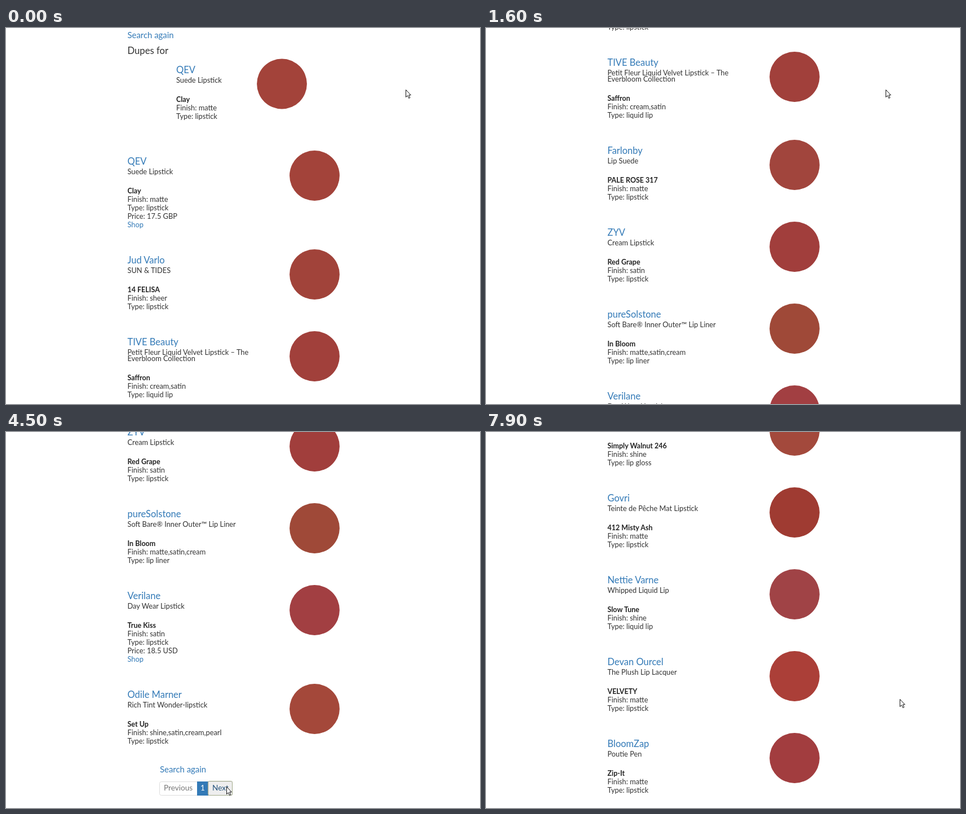
An HTML page that plays this animation: 841 px wide and 666 px high, repeating every 8 s.

```html
<!DOCTYPE html>
<html lang="en">
<head>
<meta charset="utf-8">
<title>Lipstick dupes</title>
<style>
  html, body { margin: 0; width: 100%; height: 100%; overflow: hidden; background: #fff; }
  svg { display: block; width: 841px; height: 666px; font: 12.8px Lato, "Open Sans", sans-serif; }
  text { fill: #333; }
  .brand { font-size: 16.5px; }
  .title { font-size: 16.7px; }
  .again { font-size: 14.9px; }
  .shade { font-size: 12.5px; font-weight: bold; fill: #222; }
  .page { font-size: 13.6px; }
  .link { fill: #337ab7; }
  .muted { fill: #777; }
  .current { fill: #fff; }
  .cursor { fill: #fff; stroke: #111; stroke-linejoin: round; }
</style>
</head>
<body>
<svg id="stage" viewBox="0 0 841 666"></svg>
<script>
const LOOP = 8000;
const TICK = 100;
const LINE = 15;
const stage = document.getElementById("stage");

function add(parent, tag, attrs = {}, content = "") {
  const node = document.createElementNS("http://www.w3.org/2000/svg", tag);
  for (const key in attrs) node.setAttribute(key, attrs[key]);
  node.textContent = content;
  parent.append(node);
  return node;
}

const label = (parent, x, y, content, cls = "") =>
  add(parent, "text", { x, y, class: cls }, content);

// Draws one product and returns the top of the next one.
function product(parent, top, [brand, range, shade, finish, type, color, price], x = 215.5, cx = 547.5) {
  const lines = range.split("|");
  label(parent, x, top + 25, brand, "brand link");
  lines.forEach((line, i) => label(parent, x, top + 42 + i * 11, line));
  let y = top + 65 + lines.length * 11;
  label(parent, x, y, shade, "shade");
  const details = ["Finish: " + finish, "Type: " + type];
  if (price) details.push("Price: " + price);
  for (const detail of details) label(parent, x, y += LINE, detail);
  if (price) label(parent, x, y += LINE, "Shop", "link");
  add(parent, "circle", { cx, cy: top + 44.5, r: 44.4, fill: color });
  return y + 39;
}

const wanted = ["QEV", "Suede Lipstick", "Clay", "matte", "lipstick", "#a3433a"];

function resultPage(products) {
  const page = add(stage, "g");
  label(page, 215.5, 18, "Search again", "again link");
  label(page, 215.5, 46, "Dupes for", "title");
  product(page, 54.5, wanted, 302, 489.5);
  products.reduce((top, item) => product(page, top, item), 217);
  return page;
}

const firstPage = resultPage([
  [...wanted, "17.5 GBP"],
  ["Jud Varlo", "SUN & TIDES", "14 FELISA", "sheer", "lipstick", "#a1433a"],
  ["TIVE Beauty", "Petit Fleur Liquid Velvet Lipstick – The|Everbloom Collection", "Saffron", "cream,satin", "liquid lip", "#a1403b"],
  ["Farlonby", "Lip Suede", "PALE ROSE 317", "matte", "lipstick", "#a1453d"],
  ["ZYV", "Cream Lipstick", "Red Grape", "satin", "lipstick", "#a13e3c"],
  ["pureSolstone", "Soft Bare® Inner Outer™ Lip Liner", "In Bloom", "matte,satin,cream", "lip liner", "#9f4938"],
  ["Verilane", "Day Wear Lipstick", "True Kiss", "satin", "lipstick", "#a23f42", "18.5 USD"],
  ["Odile Marner", "Rich Tint Wonder-lipstick", "Set Up", "shine,satin,cream,pearl", "lipstick", "#a4483a"]
]);

const secondPage = resultPage([
  ["D'Evial Lyon", "Day-Long Liptint", "Simply Walnut 246", "shine", "lip gloss", "#a3493c"],
  ["Govri", "Teinte de Pêche Mat Lipstick", "412 Misty Ash", "matte", "lipstick", "#9f3b32"],
  ["Nettie Varne", "Whipped Liquid Lip", "Slow Tune", "shine", "liquid lip", "#a04346"],
  ["Devan Ourcel", "The Plush Lip Lacquer", "VELVETY", "matte", "lipstick", "#ab3f38"],
  ["BloomZap", "Poutie Pen", "Zip-It", "matte", "lipstick", "#a23d3f"]
]);

// Pagination under the first list
const pager = add(firstPage, "g", { transform: "translate(272 1476)" });
label(pager, 1, -16, "Search again", "again link");
add(pager, "rect", { x: 0.5, y: 0.5, width: 129, height: 24, rx: 3, fill: "#fff", stroke: "#ddd" });
const next = add(pager, "path", { d: "M87.5.5H126.5a3 3 0 0 1 3 3V21.5a3 3 0 0 1-3 3H87.5Z", stroke: "#ddd" });
add(pager, "rect", { x: 67, width: 20, height: 25, fill: "#337ab7" });
label(pager, 8, 16, "Previous", "page muted");
label(pager, 73, 16, "1", "page current");
const nextLabel = label(pager, 94, 16, "Next", "page");
const focusRing = add(pager, "rect", { x: 86.5, y: -0.5, width: 43, height: 25, rx: 2, fill: "none", stroke: "#a3ab8b" });

const arrow = add(stage, "path", {
  class: "cursor",
  d: "M.5.5V13.5L3.5 10.7 5.7 15.5 7.8 14.5 5.7 9.8H9.3Z"
});
const hand = add(stage, "path", {
  class: "cursor",
  d: "M.5 1.5Q1.5-.3 2.7 1.5V6L6 6.5 9.5 7.7V11L8 15.5H1.5L-2.5 9.5Q-2.5 7.5-.5 9Z"
});

// Smooth progress from 0 to 1 between two times.
function ease(time, start, end) {
  const k = Math.min(1, Math.max(0, (time - start) / (end - start)));
  return k * k * (3 - 2 * k);
}

const firstScroll = t =>
  441 * ease(t, 200, 1200) + 108 * ease(t, 1500, 1700) + 52 * ease(t, 1800, 2300) +
  203 * ease(t, 2300, 2500) + 53 * ease(t, 2900, 3000);

const secondScroll = t =>
  66 * ease(t, 7300, 7400) + 66 * ease(t, 7500, 7600) + 132 * ease(t, 7700, 7900);

function cursorAt(t) {
  const approach = ease(t, 3200, 3500), settle = ease(t, 3600, 3800);
  const leave = ease(t, 6200, 6500), rest = ease(t, 6600, 6800);
  return [
    709 - 305 * approach - 13 * settle + 329 * leave + 14 * rest,
    109 + 491 * approach + 28 * settle - 154 * leave - rest
  ].map(Math.round);
}

const show = (node, visible) => node.setAttribute("visibility", visible ? "visible" : "hidden");
const move = (node, x, y) => node.setAttribute("transform", `translate(${x} ${y})`);

function draw() {
  const now = performance.now() % LOOP;
  const time = now - now % TICK;
  const onSecond = time >= 5800;
  const hovering = time >= 3700;
  const pointing = hovering && time < 4500;
  const cursor = cursorAt(time);

  show(firstPage, !onSecond);
  show(secondPage, onSecond);
  move(firstPage, 0, -Math.round(firstScroll(time)));
  move(secondPage, 0, -Math.round(secondScroll(time)));

  next.setAttribute("fill", hovering ? "#eee" : "#fff");
  nextLabel.style.fill = hovering ? "#23527c" : "#337ab7";
  show(focusRing, !onSecond && time >= 4300);

  show(arrow, !pointing);
  show(hand, pointing);
  move(arrow, ...cursor);
  move(hand, ...cursor);
  requestAnimationFrame(draw);
}
draw();
</script>
</body>
</html>
```
